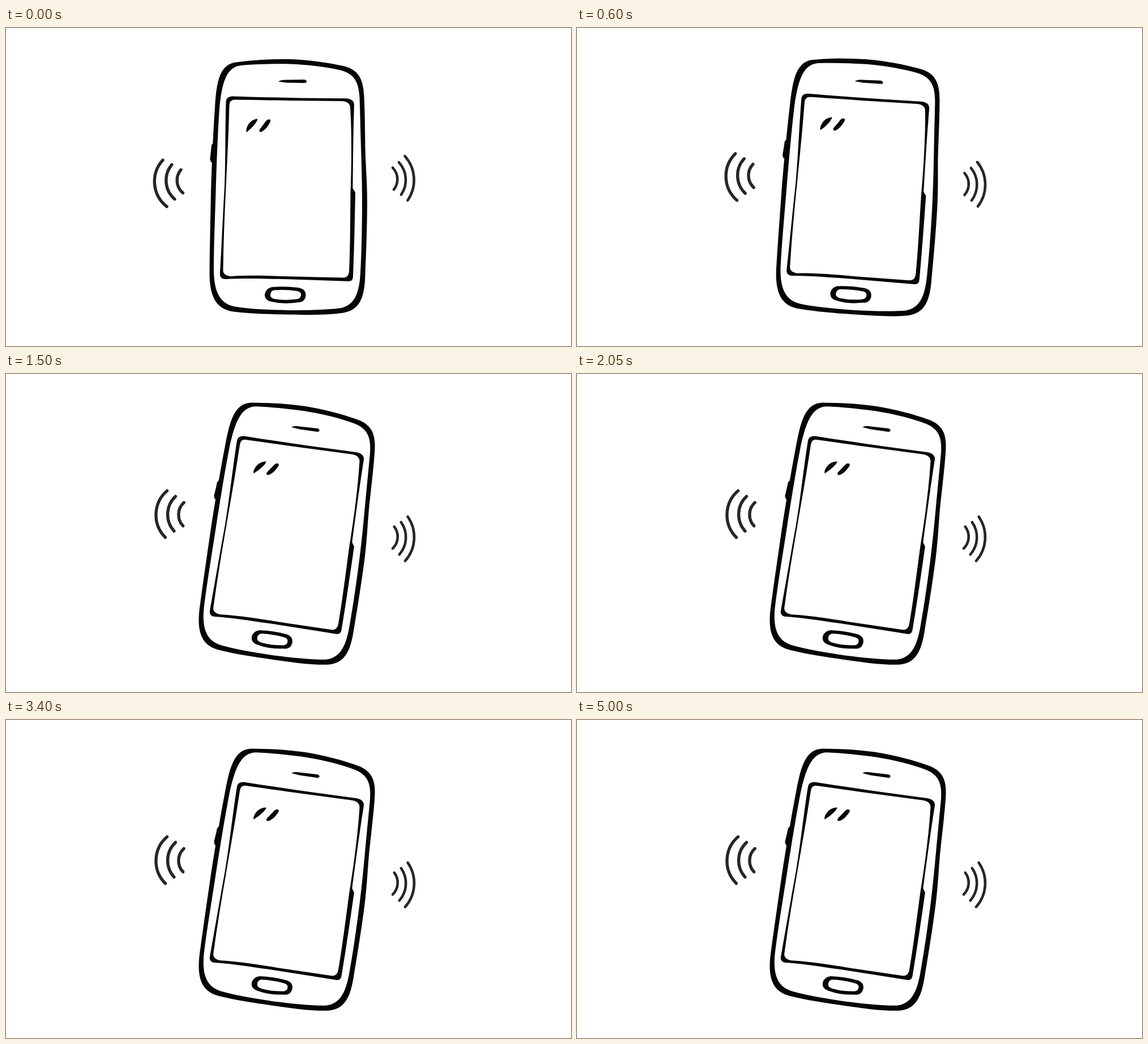
Animation of 998 by 561 pixels, one loop 5.05 s. Source, as an HTML page with a canvas:

```html
<!DOCTYPE html>
<html lang="en">
<head>
<meta charset="utf-8">
<title>Ringing phone</title>
<style>
  html, body { margin: 0; width: 100%; height: 100%; overflow: hidden; background: #fff; }
  canvas { display: block; width: 998px; height: 561px; }
</style>
</head>
<body>
<canvas id="stage" width="998" height="561"></canvas>
<script>
const ctx = document.getElementById('stage').getContext('2d');
const W = 998, H = 561;
const LOOP = 5050, STEP = 50;
const SWING = 24.1, PERIOD = 201.3, STOP = 1116.7;
const INK = '#050505', WAVE = '#262626';

// Each ring is an outer edge followed by an inner edge, filled even-odd.
const body = new Path2D(`
  M410 60 C440 56 470 54.5 500 55 C535 56 568 61 597 67.3
  C624 74 631 92 632.5 120 C634 150 634 180 634.5 210
  C635 240 638 270 638 305 C638 350 636 400 634.5 435
  C633.5 478 624 497 596 502.5 C565 507 530 506 500 505.5
  C465 505 432 504 403 500.5 C374 497 359 478 359.5 430
  C360 385 361 340 362 290 C363.5 240 366 185 369 140
  C372 96 376 62 410 60 Z
  M415 66 C440 64 470 63 500 63.5 C535 64.5 568 69 593 75
  C617 82 623 98 624.5 122 C625.5 150 626 180 627 210
  C628 240 629 270 629 305 C629 350 628 395 626 432
  C624 468 616 488 592 494 C565 497.5 530 498 500 498
  C465 497 433 496 407 492 C380 488 368 469 367 430
  C367 385 369 340 370.5 290 C372 240 374 185 377 142
  C381 102 387 69 415 66 Z`);

const screen = new Path2D(`
  M388.5 132 Q388 121 400 120.5 C440 122 480 122.5 520 123.5
  L600 124.3 Q615 125 615 136 C613.5 180 613 230 612.5 283
  L617 290 C616 340 615 390 613 438 Q613 447.5 604 446.8
  L500 443.3 C460 443 430 441 388 443 Q377 443 378 432
  C381 380 383 330 386 280 C388 230 387 180 388.5 132 Z
  M394.5 136 Q395 126.5 404 126.5 C440 127 470 127.5 500 128
  L594 129 Q607 130 608 140 C610 170 610 200 610 230
  C609.5 260 609 280 608.5 290 C608 340 608 390 606 430
  Q605 440 596 440.5 L500 438.3 C460 437 430 436 398 438
  Q384 437 383.5 428 C384 380 386 330 388.5 280
  C391 230 393 190 394.5 136 Z`);

const home = new Path2D(`
  M470 457 Q492 455 516 458 Q530 460 529.5 472 Q528 484 516 484
  Q490 488 470 483 Q457 481 457 470 Q459 459 470 457 Z
  M474 462.5 Q495 461 514 464 Q522 465 521 472 Q520 478 512 478.5
  Q492 481 474 478 Q466 476 467 470 Q468 463 474 462.5 Z`);

const details = new Path2D(`
  M367 203 L364 205 Q362.5 207 362.5 212 L360.3 232 L362.5 237 L367 238 Z
  M481 94.5 Q486 91 495 91.5 L527 91 Q531.5 92 531 95 Q530 97.5 526 97 L496 96.5 Z
  M444 160 Q432 162 427 172 Q423 180 425 184 Q434 177 440 169 Q445 162 444 160 Z
  M467 162 Q462 159 457 167 L448 179 Q446 184 451 183.5 Q459 179 463 172 Q468 165 467 162 Z`);

const leftWaves = new Path2D(`
  M277 233 A56 56 0 0 0 284 315
  M293 241 A43.5 43.5 0 0 0 298 302
  M309 250 A29 29 0 0 0 312.5 291`);

const rightWaves = new Path2D(`
  M704.5 226 A63 63 0 0 1 709.5 304
  M694 237 A46 46 0 0 1 698 294
  M683 246.5 A29 29 0 0 1 685 285`);

// Fast swing that halts partway through a stroke and then rests.
function angleAt(t) {
  return -SWING * Math.sin(2 * Math.PI * Math.min(t, STOP) / PERIOD);
}

function strokeWaves(path, width) {
  ctx.lineWidth = width;
  ctx.stroke(path);
}

function draw(t) {
  ctx.setTransform(1, 0, 0, 1, 0, 0);
  ctx.fillStyle = '#fff';
  ctx.fillRect(0, 0, W, H);
  ctx.translate(W / 2, H / 2);
  ctx.rotate(angleAt(t) * Math.PI / 180);
  ctx.translate(-W / 2, -H / 2);

  ctx.fillStyle = INK;
  for (const ring of [body, screen, home]) ctx.fill(ring, 'evenodd');
  ctx.fill(details);

  ctx.strokeStyle = WAVE;
  ctx.lineCap = 'round';
  strokeWaves(leftWaves, 5.4);
  strokeWaves(rightWaves, 4.6);
}

const start = performance.now();
function tick() {
  const t = (performance.now() - start) % LOOP;
  draw(Math.floor(t / STEP) * STEP);
  requestAnimationFrame(tick);
}
tick();
</script>
</body>
</html>
```
